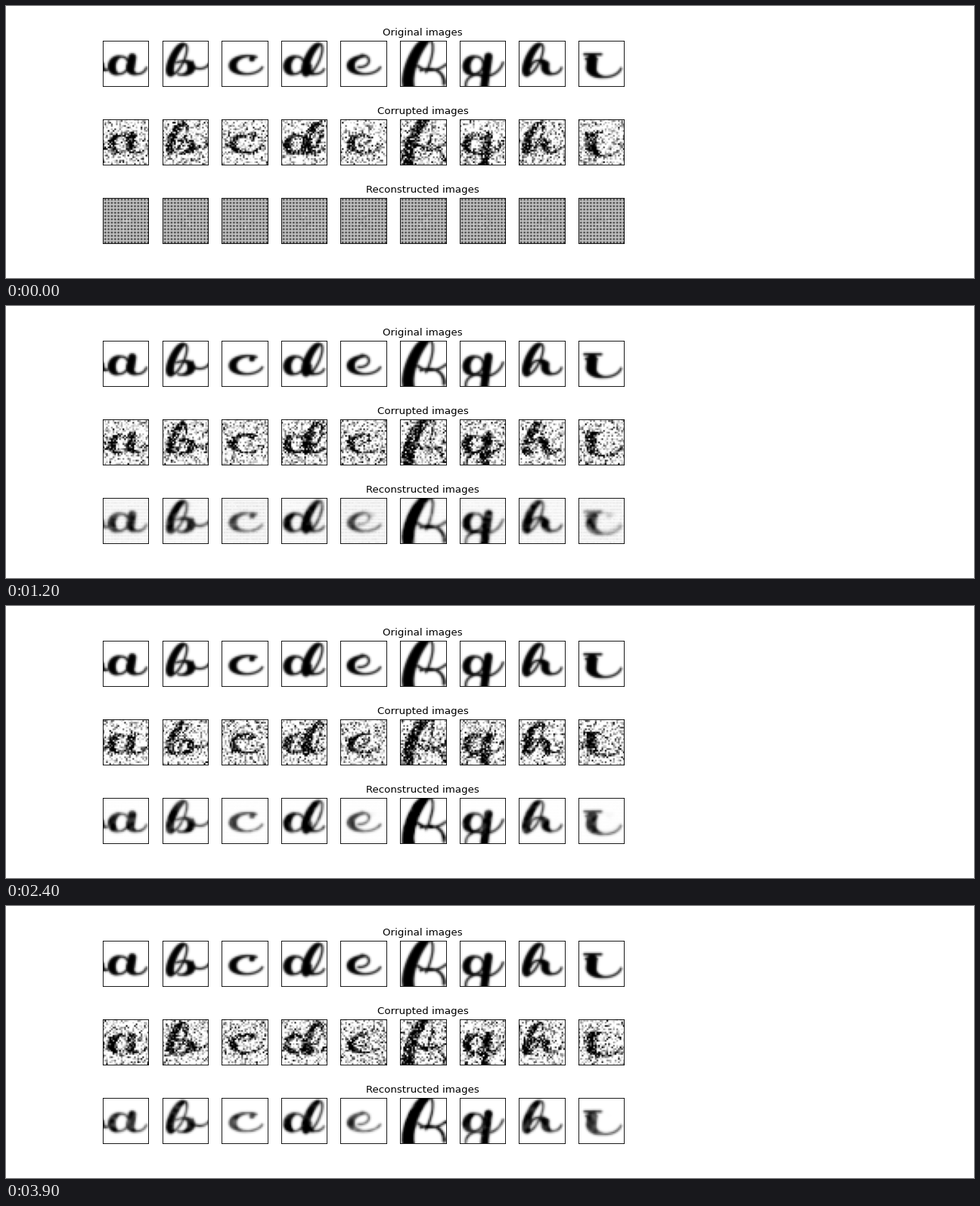
Animation, 1280 px wide and 360 px high, one loop 4 s. Source, as a matplotlib script:

```python
import numpy as np
import matplotlib.pyplot as plt
from matplotlib.animation import FuncAnimation

N = 28             # pixels per glyph side
CELL = 61          # units of the pen coordinates
FRAMES = 40

plt.rcParams["font.family"] = "DejaVu Sans"


def pen(x, y, thick, thin):
    """Pointed pen: wide when moving down, narrow otherwise."""
    dx, dy = np.gradient(x), np.gradient(y)
    down = np.clip(dy / (np.hypot(dx, dy) + 1e-9), 0, 1) ** 1.3
    return x, y, thin + (thick - thin) * down


def arc(cx, cy, rx, ry, start, end, lean=0.12, thick=5.4, thin=1.4):
    """Leaning elliptic stroke; rising angles run anticlockwise."""
    a = np.radians(np.linspace(start, end, 130))
    return pen(cx + rx * np.cos(a) + lean * ry * np.sin(a), cy - ry * np.sin(a), thick, thin)


def line(x0, y0, x1, y1, thick=5.4, thin=1.7):
    return pen(np.linspace(x0, x1, 60), np.linspace(y0, y1, 60), thick, thin)


def bowl(cx, cy=33.5, rx=11):
    return arc(cx, cy, rx, 11.5, 40, 400)


def ascender(cx):
    return arc(cx, 25.5, 8, 20, -100, 260, lean=0.4)


def tail(x, y, rx=11, ry=10, thick=5.4):
    """Exit stroke that sweeps down from (x, y) and up to the right."""
    return arc(x + rx, y, rx, ry, 165, 350, thick=thick)


def blur(image, sigma):
    i = np.arange(len(image))
    g = np.exp(-((i[:, None] - i) ** 2) / (2 * sigma**2))
    g /= g.sum(axis=1, keepdims=True)
    return g @ image @ g.T


def ink(*strokes, scale=3):
    """Rasterise strokes to an N x N coverage map, 1 = black."""
    size = N * scale
    axis = (np.arange(size) + 0.5) * CELL / size
    gx, gy = np.meshgrid(axis, axis)
    cover = np.zeros((size, size))
    for stroke in strokes:
        for x, y, r in zip(*stroke):
            cover = np.maximum(cover, np.clip(r - np.hypot(gx - x, gy - y) + 0.5, 0, 1))
    return blur(cover.reshape(N, scale, N, scale).mean(axis=(1, 3)), 0.55)


glyphs = {
    "a": ink(bowl(23), line(39, 23, 37, 36), tail(36, 35),
             arc(5, 30, 6, 10, 190, 290, thick=3)),
    "b": ink(ascender(21), arc(26, 37, 12, 9, 130, -110), tail(39, 31, ry=7, thick=2)),
    "c": ink(arc(35, 33, 20, 12, 60, 345), arc(41, 25, 2, 2, 0, 360, thick=2.5)),
    "d": ink(bowl(19), ascender(43), tail(35, 37, ry=8)),
    "e": ink(arc(34, 33, 20, 12, 100, 345), arc(27, 28, 11, 8, -100, 90)),
    "f": ink(arc(27, 32, 12, 32, -20, 250, lean=0.35, thick=8),
             arc(42, 25, 22, 15, 220, 330, thick=2),
             arc(36, 58, 22, 20, 120, 0, thick=2)),
    "g": ink(bowl(20), line(38, 22, 32, 64),
             arc(22, 58, 14, 12, 200, 60), arc(36, 26, 22, 22, 270, 350)),
    "h": ink(ascender(21), arc(25, 38, 10, 11, 170, 0), tail(35, 35)),
    "i": ink(line(18, 26, 17, 38, thick=7), tail(17, 35, rx=20, ry=14, thick=7),
             line(8, 19, 30, 19), line(10, 25, 24, 25)),
}

row, col = np.mgrid[:N, :N]
DOTS = (row % 2 == 1) & (col % 2 == 1)
GRID = 0.45 + 0.55 * (row % 2) + 0.3 * DOTS


def corrupted(letter, rng):
    return np.clip(1 - glyphs[letter] + rng.normal(0, 0.42, (N, N)), 0, 1)


def reconstructed(letter, frame, rng):
    noise = rng.normal(0, 1, (N, N))
    if frame == 0:
        middle = np.exp(-((row - 14) ** 2 + (col - 14) ** 2) / 50)
        return np.clip(0.76 - 0.5 * DOTS - 0.04 * (row % 2) + 0.05 * noise * middle, 0, 1)

    shape = glyphs[letter]
    weight = shape.mean()
    if letter in "ei":    # both pass for a "c" while training is young
        doubt = np.exp(-frame / 9)
        shape = (1 - doubt) * shape + doubt * glyphs["c"]
    shape = blur(shape, 0.45 + 1.1 * np.exp(-frame / 6)) ** 1.2

    # heavy letters are learned darker and lose the grid sooner
    learned = (0.55 + 1.8 * weight) * (1 - np.exp(-frame / 2.6))
    wobble = 1 + 0.3 * blur(noise, 1)
    haze = 0.27 * (1 - 2 * weight) * np.exp(-(frame - 5) / 6)
    texture = GRID * (1 + 0.2 * noise)
    return np.clip(1 - learned * shape * wobble - haze * texture * (1 - 0.5 * shape), 0, 1)


fig = plt.figure(figsize=(16, 4.5), dpi=80, facecolor="white")
grid = fig.add_gridspec(3, 10, left=0.1, right=0.7, bottom=0.1, top=0.9,
                        wspace=0.3, hspace=0.3)
titles = ["Original images", "Corrupted images", "Reconstructed images"]
images = []
for r, title in enumerate(titles):
    images.append([])
    for c, letter in enumerate(glyphs):
        ax = fig.add_subplot(grid[r, c])
        ax.set(xticks=[], yticks=[])
        images[r].append(ax.imshow(1 - glyphs[letter], cmap="gray", vmin=0, vmax=1))
        if c == 5:
            ax.set_title(title)


def update(frame):
    rng = np.random.default_rng(100 + frame)
    for letter, noisy, clean in zip(glyphs, images[1], images[2]):
        noisy.set_data(corrupted(letter, rng))
        clean.set_data(reconstructed(letter, frame, rng))
    return images[1] + images[2]


anim = FuncAnimation(fig, update, frames=FRAMES, interval=100, repeat=True,
                     repeat_delay=0, blit=False)
plt.show()
```
